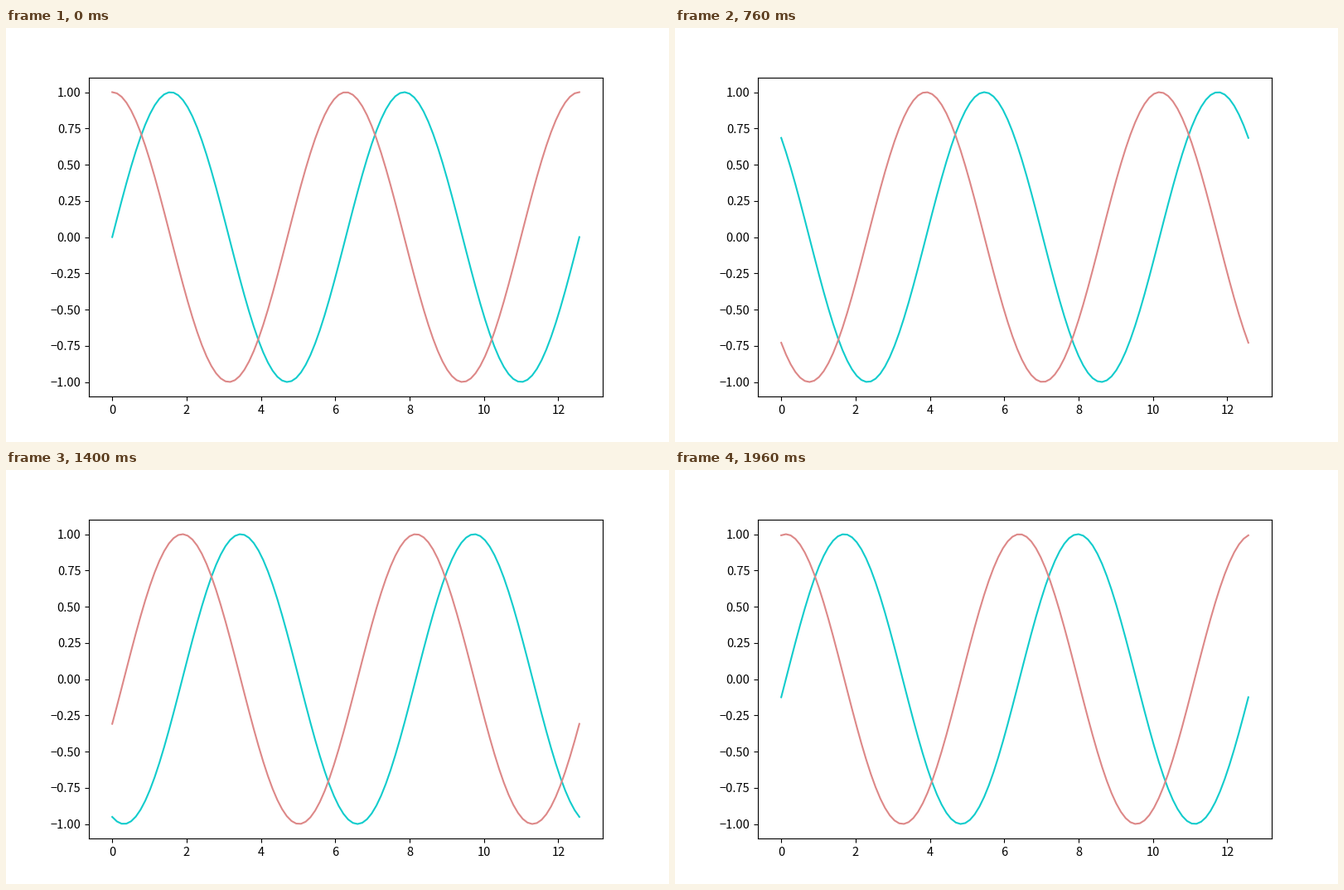
A matplotlib script for the animation above (2000 ms loop, 800 by 500 pixels).

```python
import matplotlib.pyplot as plt
import numpy as np
from matplotlib.animation import FuncAnimation

FRAMES = 50
INTERVAL = 40

plt.rcParams["font.family"] = ["Noto Sans CJK JP", "DejaVu Sans"]
plt.rcParams["font.size"] = 10.5

fig, ax = plt.subplots(figsize=(8, 5), dpi=100)
x = np.linspace(0, 4 * np.pi, 100)
sine, = ax.plot(x, np.sin(x), color="#11cccc", lw=1.5)
cosine, = ax.plot(x, np.cos(x), color="#dd8888", lw=1.5)


def update(frame):
    phase = 2 * np.pi * frame / FRAMES
    sine.set_ydata(np.sin(x + phase))
    cosine.set_ydata(np.cos(x + phase))
    return sine, cosine


anim = FuncAnimation(fig, update, frames=FRAMES, interval=INTERVAL,
                     repeat=True, repeat_delay=0)
plt.show()
```
